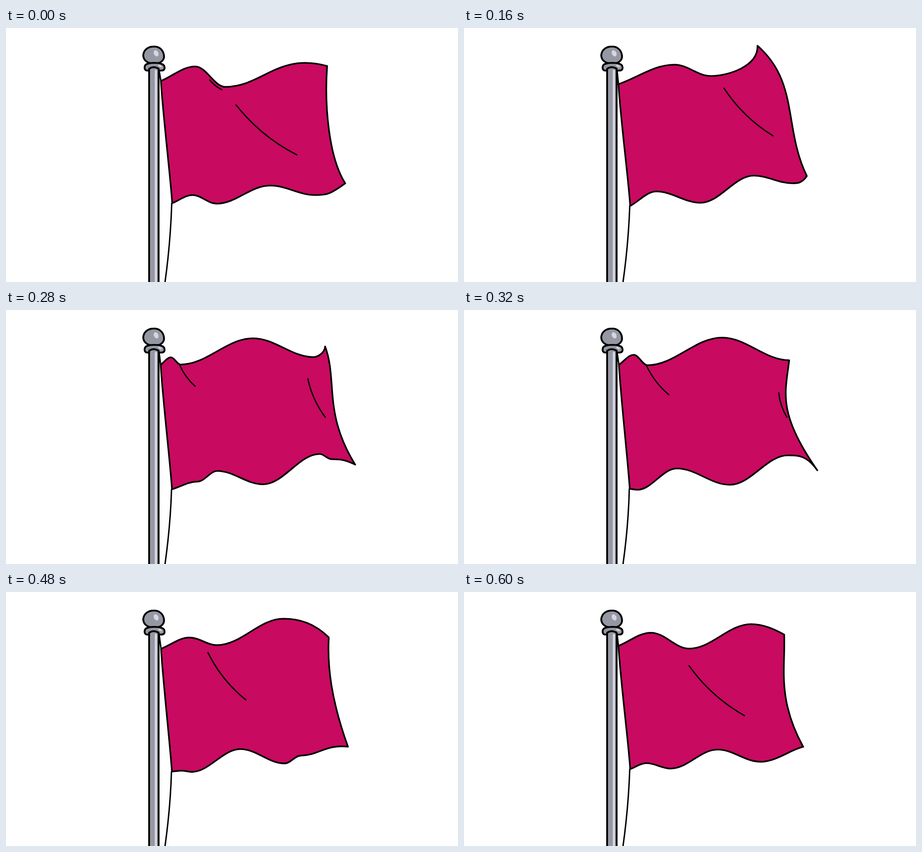
Recreate the animation shown at these times as an HTML page. Size 998x561 px, loop 0.64 s.

```html
<!DOCTYPE html>
<html lang="en">
<head>
<meta charset="utf-8">
<title>Waving flag</title>
<style>
  html, body { margin: 0; width: 100%; height: 100%; overflow: hidden; background: #fff; }
  svg { display: block; width: 998px; height: 561px; }
</style>
</head>
<body>
<svg viewBox="0 0 998 561" fill="none" stroke="#000" stroke-width="3.6" stroke-linecap="round" stroke-linejoin="round">
  <path id="cloth" fill="#c80a60"/>
  <path id="cord" stroke-width="3.1"/>
  <path id="folds" stroke-width="2.9"/>
  <g fill="#9598a2" stroke-width="4">
    <path d="M326 41C340 40 349 51 349 64C348 72 341 79 326 79C312 78 303 71 303 60C304 48 314 41 326 41Z"/>
    <path d="M307 83C311 75 343 75 349 83C352 90 349 94 343 94H312C306 94 305 88 307 83Z"/>
    <path d="M316 570V90Q326 83 337 90V570Z"/>
  </g>
  <g fill="#d6d6e2" stroke="none">
    <ellipse cx="331.5" cy="56" rx="5" ry="7.2" transform="rotate(-25 331.5 56)"/>
    <ellipse cx="340" cy="84" rx="4.5" ry="2" transform="rotate(25 340 84)"/>
    <path d="M328.5 94Q331 90 333.5 94V561H328.5Z"/>
  </g>
</svg>
<script>
const STEP = 40, LOOP = 640;
const $ = id => document.getElementById(id);

// "=" repeats the point before it: a crest or trough not yet, or no longer, on the cloth
function parse(text) {
  const pts = [];
  for (const word of text.split(' ').filter(Boolean))
    pts.push(word === '=' ? pts.at(-1) : word.split(',').map(Number));
  return pts;
}

const poses = [];
const pose = (time, ...parts) => poses.push({ time, parts: parts.map(parse) });

// Top and bottom: hoist corner, crests and troughs, lean of the last stretch, free corner.
// Then the two handles of the free edge, and the ends of the folds.
pose(0, '342,117 418,85 = = 484,130 600,54 709,84',
  '367,387 412,369 = = 465,388 583,348 683,369 715,368 749,343',
  '703,170 712,285', '508,170 642,280', '', '450,115 476,136');
pose(160, '341,124 465,81 = = 545,106 650,85 648,39',
  '367,393 425,361 = = 522,386 640,326 725,343 746,343 757,327',
  '740,120 705,220', '574,133 682,238', '341,124 =', '543,106 =');
pose(240, '341,121 353,110 366,119 521,64 640,97 690,78 691,50',
  '367,397 463,361 = = 548,384 670,315 723,338 738,339 762,329',
  '755,130 710,230', '638,121 697,237', '363,118 383,150');
pose(320, '342,121 375,99 405,122 570,61 718,111 = =',
  '366,395 383,397 = 470,350 587,386 715,321 = 757,321 780,354',
  '710,180 690,225', '695,183 713,237', '402,121 452,187');
pose(400, '341,124 386,100 432,114 607,59 = 685,65 722,107',
  '367,396 388,400 = 493,347 602,382 708,330 = 738,332 761,349',
  '680,190 760,240', '', '412,112 496,222');
pose(520, '343,126 415,101 483,119 615,59 = 680,72 708,97',
  '366,397 388,392 421,396 530,347 622,377 = = 690,338 752,338',
  '724,150 696,235', '', '463,145 546,246');
pose(600, '341,119 413,90 497,125 634,71 = 685,82 707,94',
  '367,391 403,378 456,390 560,348 655,375 = = 725,346 749,342',
  '710,165 690,235', '', '497,163 619,273');

const mix = (a, b, k) => a.map((p, i) => b[i] ? p.map((v, j) => v + (b[i][j] - v) * k) : p);
const path = ([start, ...rest]) => `M${start}C${rest}`;

// Bezier chain close to a cosine: level at each crest and trough, free at both ends
function wave(pts) {
  const knots = pts.toSpliced(-2, 1), lean = pts.at(-2), ease = .364;
  const chain = [knots[0]];
  for (let i = 1; i < knots.length; i++) {
    const [x0, y0] = knots[i - 1], [x1, y1] = knots[i];
    const reach = (x1 - x0) * ease, rise = i === 1 ? (y1 - y0) * ease : 0;
    const last = i === knots.length - 1;
    chain.push([x0 + reach, y0 + rise], last ? lean : [x1 - reach, y1], knots[i]);
  }
  return chain;
}

// Crease that sags a little to the lower left
function fold([[x0, y0], [x1, y1]]) {
  const sag = .11;
  const x = (x0 + x1) / 2 - (y1 - y0) * sag, y = (y0 + y1) / 2 + (x1 - x0) * sag;
  return `M${x0},${y0}Q${x},${y} ${x1},${y1}`;
}

function draw(time) {
  const i = poses.findLastIndex(p => p.time <= time);
  const a = poses[i], b = poses[i + 1] || a;
  const k = a === b ? 0 : (time - a.time) / (b.time - a.time);
  const [top, bottom, fly, ...folds] =
    a.parts.map((part, n) => mix(part, b.parts[n] || [], k));
  const [x0, y0] = top[0], [x1, y1] = bottom[0];

  $('cloth').setAttribute('d', path([
    ...wave(top), ...fly, ...wave(bottom).reverse(),
    [x1 - 4, y1 - 60], [x0 + 5, y0 + 80], top[0]
  ]) + 'Z');
  $('cord').setAttribute('d', `M338,93L${x0},${y0}M${x1 - 1},${y1}Q363,477 351,562`);
  $('folds').setAttribute('d', folds.filter(f => f.length).map(fold).join(''));
}

function tick() {
  draw(Math.floor(performance.now() % LOOP / STEP) * STEP);
  requestAnimationFrame(tick);
}
tick();
</script>
</body>
</html>
```
